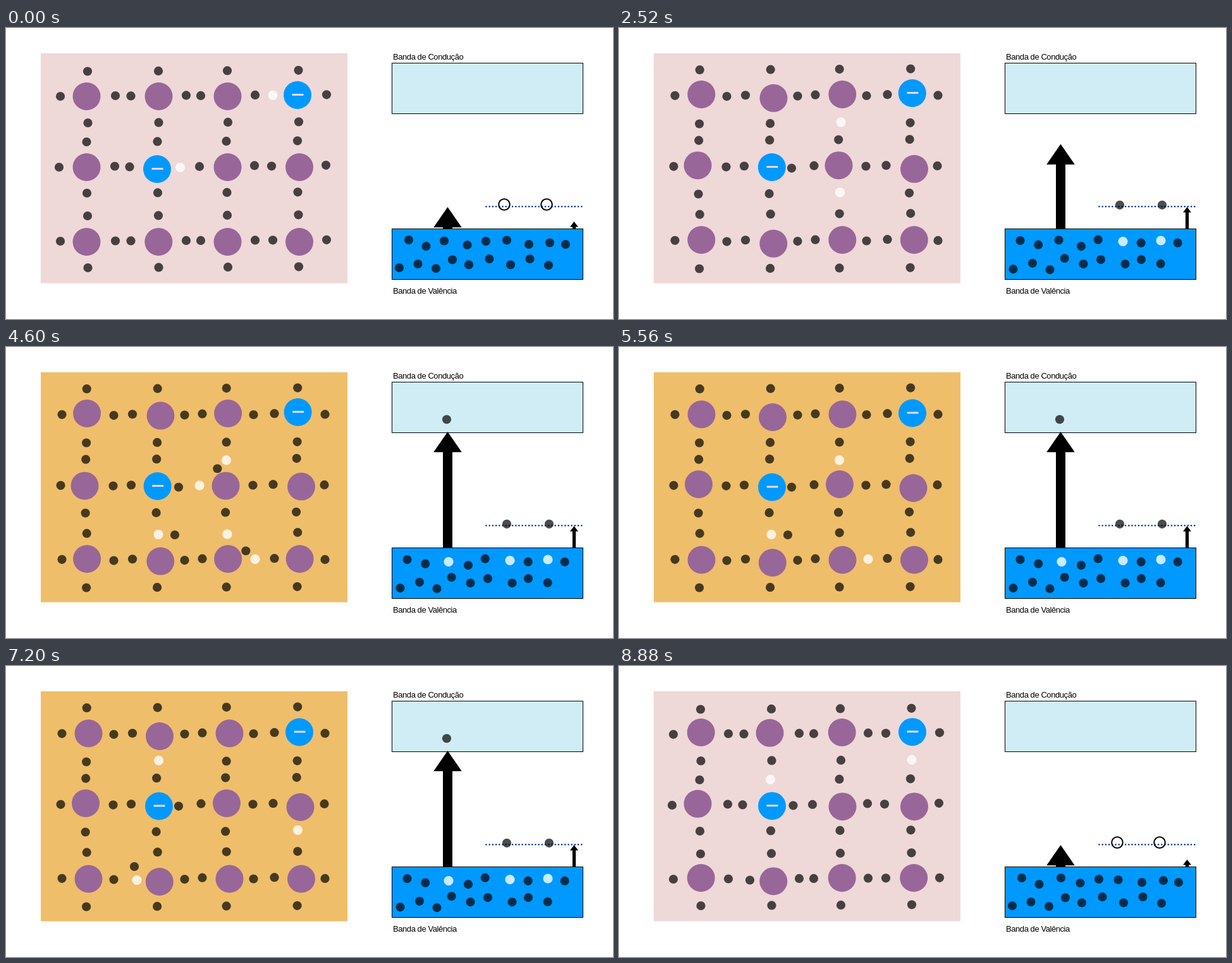
Recreate the animation shown at these times as an HTML page. Size 960 px wide and 460 px high, loop 8920 ms.

```html
<!DOCTYPE html>
<html lang="pt">
<head>
<meta charset="utf-8">
<style>
  html, body { margin: 0; width: 100%; height: 100%; overflow: hidden; background: #fff; }
  svg { display: block; }
  text { font: 13px "Liberation Sans", Arial, sans-serif; letter-spacing: -.43px; }
</style>
</head>
<body>
<svg width="960" height="460" viewBox="0 0 960 460">
  <rect id="crystal" x="55" y="40" width="485" height="363.5"/>
  <g id="lattice"></g>
  <text x="612" y="49.5">Banda de Condução</text>
  <text x="612" y="419.5">Banda de Valência</text>
  <rect x="610.5" y="55.5" width="302" height="80" fill="#d0edf6" stroke="#000"/>
  <path id="arrows"/>
  <rect x="610.5" y="317.5" width="302" height="80" fill="#0099ff" stroke="#000"/>
  <path d="M759.5 282.3H911" stroke="#039" stroke-width="2.6" stroke-linecap="round" stroke-dasharray="0 5.2"/>
  <g id="bands"></g>
</svg>
<script>
const FRAME = 40, FRAMES = 223, HEAT_ON = 96, HEAT_OFF = 196;
const el = id => document.getElementById(id);
const mix = (a, b, k) => a.map((v, i) => v + (b[i] - v) * k);
const add = (a, b) => [a[0] + b[0], a[1] + b[1]];
const clamp = k => Math.min(1, Math.max(0, k));

const dot = ([x, y], r, style) => `<circle cx="${x}" cy="${y}" r="${r}" ${style}/>`;
const electron = p => dot(p, 7.1, 'fill-opacity=".7"');
const hole = p => dot(p, 7.6, 'fill="#fff" fill-opacity=".8"');
const ring = p => dot(p, 8.8, 'fill="none" stroke="#000" stroke-width="2"');

// Position along timed points [frame, x, y]
function track(points, f) {
  let i = 0;
  while (i < points.length - 2 && f >= points[i + 1][0]) i++;
  const [a, ...p] = points[i], [b, ...q] = points[i + 1];
  return mix(p, q, clamp((f - a) / (b - a)));
}

// Electron vibration: three held poses per kind
const shake = {
  u: [[0, 0], [-1, 0], [-1.3, -2.3]],
  l: [[0, 0], [0, -.8], [2.5, -1.2]],
  r: [[0, 0], [0, .9], [-2.5, 1.1]],
  d: [[0, 0], [0, 1], [-2.4, 1.5]],
  v: [[0, 0], [1.2, 0], [1.5, 2.1]]
};
const jitter = (kind, f) => {
  const k = f % 13;
  return shake[kind][k < 4 ? 0 : k < 8 ? 1 : 2];
};

// Bond electrons, keyed by side + row + column
const sides = {
  u: { x: [129, 127.5, 129], y: [68.5, 180, 297], col: [0, 112, 221, 333.5] },
  r: { x: [173, 172, 173], y: [107, 218.5, 336.5], col: [0, 112, 221, 334] },
  d: { x: [129.5, 128, 129.5], y: [150, 261, 379], col: [0, 112, 221.5, 333.5] },
  l: { x: [86, 84, 86], y: [108, 220, 337], col: [0, 111.5, 222, 336] }
};
const sites = {};
for (const s in sides)
  for (let r = 0; r < 3; r++)
    for (let c = 0; c < 4; c++)
      sites[s + r + c] = [sides[s].x[r] + sides[s].col[c], sides[s].y[r] - .55 * c];
sites.r11 = [275.5, 220.5];
const displaced = [207, 338.5];

// Hole routes: next site, hop start, hop end
const routes = [
  { from: 'l03', hops: [['r02', 8, 26], ['d02', 38, 56], ['u12', 66, 76], ['l12', 80, 90], ['u12', 110, 125],
    ['d02', 145, 152], ['l02', 154, 161], ['r01', 162, 169], ['d01', 170, 178], ['u11', 190, 213]] },
  { from: 'r11', hops: [['l12', 8, 26], ['d12', 38, 56], ['u22', 70, 88], ['r22', 110, 125], ['l23', 145, 153],
    ['u23', 156, 164], ['d13', 168, 177], ['u13', 184, 195], ['d03', 199, 213]] },
  { from: 'u21', hops: [['l21', 145, 168]], start: 98, end: 210 }
];
const freePath = [[98, 241, 296.5], [110, 267, 297], [145, 267, 297], [175, 203, 317], [196, 203, 317], [210, 207, 338]];

// Atoms: vibration path kind, x, y
const loops = {
  p: [[3, 0], [3, -3], [0, -3]],
  q: [[0, 3], [3, 3], [3, 0]],
  s: [[0, -3], [-3, -3], [-3, 0]]
};
const atoms = [
  ['p', 127.5, 108], ['q', 241.5, 108, 's'], ['p', 350.5, 108], ['p', 461, 106, 'p', true],
  ['s', 127.5, 220], ['p', 239, 223, 'p', true], ['s', 350.5, 220, 'q'], ['q', 464, 220],
  ['p', 127.5, 338], ['q', 241.3, 338], ['p', 350.5, 338], ['p', 464, 338]
];
function atom([kind, x, y, lateKind = kind, acceptor], f) {
  const late = f >= HEAT_OFF;
  const [a, b, c] = loops[late ? lateKind : kind];
  const phase = (f + (late && !acceptor ? 8 : 0)) % 41;
  const p = add([x, y], track([[0, 0, 0], [11, ...a], [21, ...b], [36, ...c], [41, 0, 0]], phase));
  return dot(p, 22, `fill="${acceptor ? '#0099ff' : '#996699'}"`) +
    (acceptor ? `<path d="M${p[0] - 8.5} ${p[1] - .5}h18" stroke="#efd8d8" stroke-width="3"/>` : '');
}

function drawLattice(f) {
  const empty = new Set();
  let out = '';
  const place = key => key === 'l21' && f >= 145 ? displaced : sites[key];
  for (const { from, hops, start = 0, end = FRAMES } of routes) {
    if (f < start || f >= end) continue;
    let at = from;
    for (const [next, t0, t1] of hops) {
      if (f < t0) break;
      if (f < t1) {
        empty.add(at).add(next);
        out += electron(mix(place(next), place(at), (f - t0) / (t1 - t0)));
      }
      if (f >= t1) at = next;
    }
    empty.add(at);
  }
  let holes = '';
  for (const key in sites)
    if (empty.has(key)) holes += hole(place(key));
    else out += electron(add(place(key), jitter(key[0], f)));
  if (f >= 98 && f < 210) out += electron(track(freePath, f));
  el('lattice').innerHTML = holes + atoms.map(a => atom(a, f)).join('') + out;
}

// Valence electrons that stay in the band
const valence = [
  ['r', 637, 335], ['u', 664.5, 345], ['v', 729.5, 343], ['u', 759, 337], ['u', 827, 342], ['u', 885, 342],
  ['v', 622, 379], ['l', 651.5, 373], ['v', 680, 380], ['u', 706, 366.3], ['l', 732, 374.3], ['r', 764.5, 365],
  ['l', 798, 374.3], ['r', 828.5, 365], ['u', 858, 375]
];
// Electrons that are lifted to a level and fall back
const lifted = [
  { kind: 'l', home: [693, 336.5], level: [697, 114.5], back: [699, 335], gap: [700, 339.5], up: [98, 110], still: true },
  { kind: 'l', home: [792, 335.5], level: [789.5, 281], back: [789.5, 338], gap: [797, 337.5], up: [8, 26], ring: [788, 279] },
  { kind: 'u', home: [860, 339.5], level: [856.5, 281], back: [861, 339], gap: [857, 336], up: [8, 26], ring: [855, 279] }
];
const DOWN = [198, 212];

function drawLifted(e, f) {
  const [u0, u1] = e.up, [d0, d1] = DOWN;
  const p = track([[u0, ...e.home], [u1, ...e.level], [d0, ...e.level], [d1, ...e.back]], f);
  const onLevel = f >= u1 && f < d0;
  const move = onLevel ? (e.still ? [0, 0] : jitter('l', f)) : f < u0 || f >= d1 ? jitter(e.kind, f) : [0, 0];
  return (f >= u0 && f < d1 ? hole(e.gap) : '') +
    (e.ring && !onLevel ? ring(e.ring) : '') + electron(add(p, move));
}

const arrow = (x, tip, half, head, shaft) =>
  `M${x} ${tip}l${half} ${head}H${x + shaft}V318H${x - shaft}V${tip + head}H${x - half}z`;

function draw(f) {
  const heated = f >= HEAT_ON && f < HEAT_OFF;
  const grown = f < HEAT_OFF ? f : 0;
  el('crystal').setAttribute('fill', heated ? '#efbe6a' : '#efd8d8');
  el('arrows').setAttribute('d',
    arrow(698.5, Math.max(134, 283 - 1.58 * grown), 22.3, 32.3, 7.5) +
    arrow(898.5, Math.max(283, 306 - .82 * grown), 6.5, 8.5, 2.6));
  drawLattice(f);
  el('bands').innerHTML = valence.map(([k, x, y]) => electron(add([x, y], jitter(k, f)))).join('') +
    lifted.map(e => drawLifted(e, f)).join('');
}

const begin = performance.now();
function tick(now) {
  draw(Math.floor(Math.max(0, now - begin) / FRAME) % FRAMES);
  requestAnimationFrame(tick);
}
draw(0);
requestAnimationFrame(tick);
</script>
</body>
</html>
```
